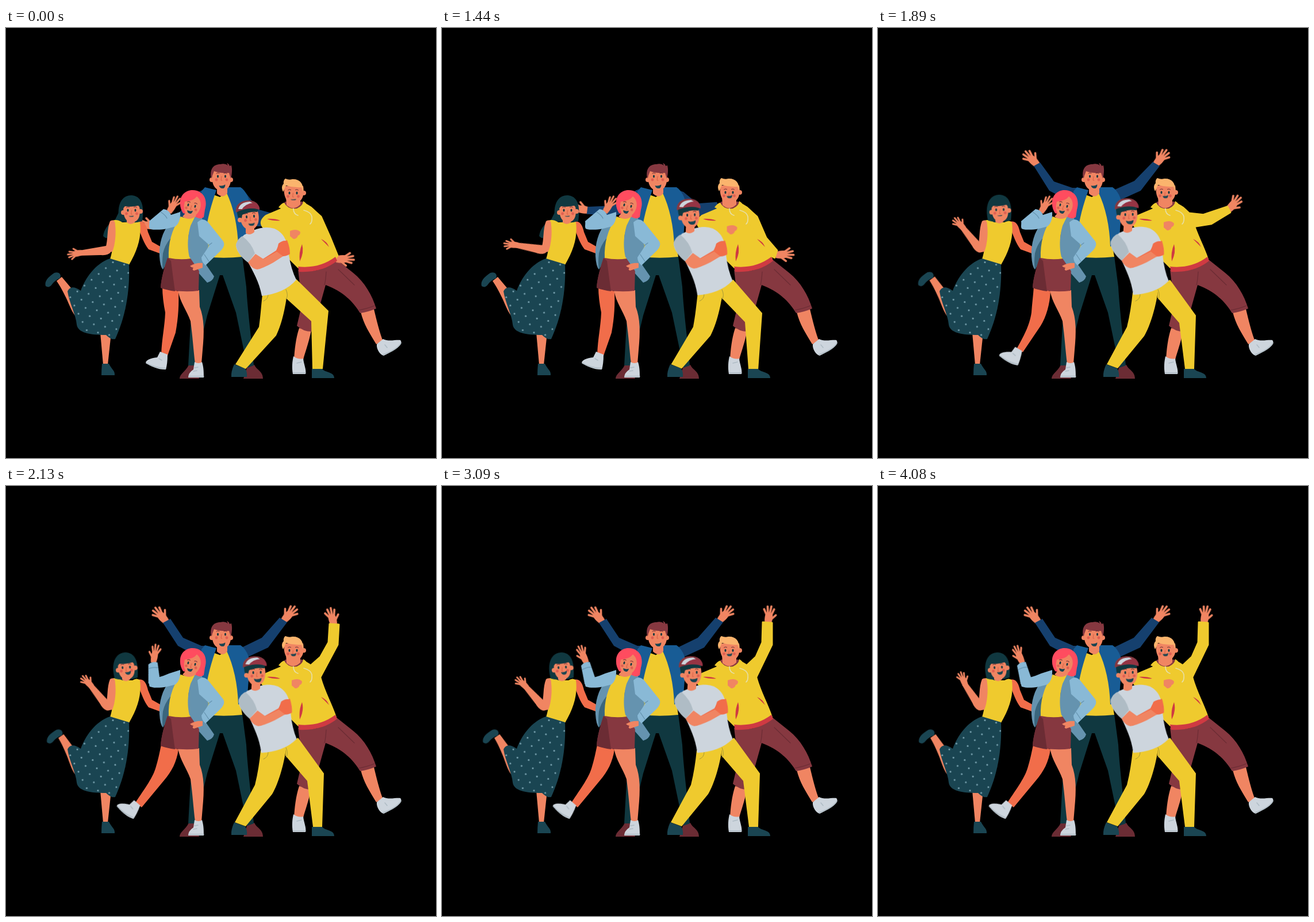
Write an HTML page that moves like this. It is 748 px wide and 748 px high and loops after 4500 ms.

```html
<!DOCTYPE html>
<html lang="en">
<head>
<meta charset="utf-8">
<title>Five friends</title>
<style>
html, body { margin: 0; width: 100%; height: 100%; overflow: hidden; background: #000; }
svg { display: block; width: 100%; height: 100%; }
.peach { fill: #f08562; } .coral { fill: #f16d4a; } .yellow { fill: #efca2e; }
.maroon { fill: #863840; } .wine { fill: #6b2c34; } .red { fill: #cf3a42; }
.teal { fill: #1a4552; } .night { fill: #103840; } .blue { fill: #185c95; } .navy { fill: #15406e; }
.sky { fill: #89b9d6; } .denim { fill: #6593af; } .grey { fill: #cdd5dd; } .shade { fill: #afbcc5; }
.pink { fill: #ff4c5f; } .blond { fill: #fbb46d; }
.line { fill: none; stroke-linecap: round; }
.move { animation: 4.5s linear infinite; }

/* tall man's arms */
@keyframes sleeveL {
  0%, 23.3% { d: path("M350 278L335 285L300 322L255 338L255 350L305 338L345 315Z"); animation-timing-function: ease-in; }
  36% { d: path("M350 278L340 280L297 298L252 288L249 301L300 316L345 310Z"); }
  42% { d: path("M350 278L338 278L306 267L282 234L271 240L298 283L340 305Z"); animation-timing-function: ease-out; }
  47%, 100% { d: path("M350 278L340 278L308 264L286 231L273 238L299 278L340 300Z"); }
}
@keyframes handL {
  0%, 23.3% { transform: translate(257px, 344px) rotate(-85deg); animation-timing-function: ease-in; }
  36% { transform: translate(249px, 294px) rotate(-76deg); }
  42% { transform: translate(275px, 236px) rotate(-45deg); animation-timing-function: ease-out; }
  47%, 100% { transform: translate(277px, 234px) rotate(-42deg); }
}
@keyframes sleeveR {
  0%, 23.3% { d: path("M400 278L418 288L440 316L462 322L460 345L430 345L405 330Z"); animation-timing-function: ease-in; }
  36% { d: path("M400 278L422 283L448 296L492 286L505 298L445 315L415 310Z"); }
  42% { d: path("M400 278L410 282L446 266L478 233L490 240L457 283L415 302Z"); animation-timing-function: ease-out; }
  47%, 100% { d: path("M400 278L410 281L445 264L476 229L489 237L456 281L415 300Z"); }
}
@keyframes handR {
  0%, 23.3% { transform: translate(480px, 345px) rotate(85deg); animation-timing-function: ease-in; }
  36% { transform: translate(505px, 291px) rotate(80deg); }
  42% { transform: translate(485px, 235px) rotate(41deg); animation-timing-function: ease-out; }
  47%, 100% { transform: translate(485px, 232px) rotate(42deg); }
}

/* hoodie */
@keyframes hoodSleeve {
  0%, 23.3% { d: path("M530 312L548 328L564 364L577 396L570 404L550 380L540 350Z"); animation-timing-function: ease-in; }
  36% { d: path("M530 312L548 328L564 366L588 379L586 396L560 394L540 350Z"); }
  42% { d: path("M530 312L541 322L566 325L608 311L613 321L580 341L547 346Z"); }
  47.3% { d: path("M530 312L547 297L561 272L563 240L579 241L577 276L546 334Z"); animation-timing-function: ease-out; }
  58%, 100% { d: path("M530 312L546 297L557 272L558 237L574 238L574 276L546 334Z"); }
}
@keyframes hoodHand {
  0%, 23.3% { transform: translate(577px, 402px) rotate(88deg); animation-timing-function: ease-in; }
  36% { transform: translate(589px, 388px) rotate(84deg); }
  42% { transform: translate(611px, 315px) rotate(42deg); }
  47.3% { transform: translate(570px, 240px) rotate(-15deg); animation-timing-function: ease-in-out; }
  58%, 100% { transform: translate(567px, 237px) rotate(10deg); }
  78% { transform: translate(567px, 237px) rotate(6deg); }
}
@keyframes restHand { 0%, 23.3% { transform: none; animation-timing-function: ease-in-out; } 36% { transform: translate(2px, -10px); } 42%, 100% { transform: translate(3px, -15px); } }
@keyframes grin { 0%, 1% { transform: translate(500px, 297px) scale(.8, .25); } 13.3%, 100% { transform: translate(500px, 292px) scale(.8, .7); } }
@keyframes nod { 0%, .7% { transform: translateY(1px); } 12%, 100% { transform: none; } }

/* cap */
@keyframes lean { 0%, 23.3% { transform: none; animation-timing-function: ease-in-out; } 36% { transform: rotate(2.9deg); } 42%, 100% { transform: rotate(3.5deg); } }
@keyframes capHead { 0%, 23.3% { transform: none; animation-timing-function: ease-in-out; } 36%, 100% { transform: translateX(4px); } }
@keyframes laugh { 0%, .7% { transform: translate(427px, 339px) scale(.9, .7); } 12%, 100% { transform: translate(427px, 338px) scale(1.1, 1); } }
@keyframes tap { 0%, 83.3% { transform: none; } 90.7%, 100% { transform: rotate(5deg); } }
@keyframes kneeL {
  0%, 23.3% { d: path("M446 464L490 450C488 480 480 515 470 535L417 593L399 585L440 520C443 500 444 480 446 464Z"); animation-timing-function: ease-in-out; }
  42%, 100% { d: path("M443 460L488 450C485 480 474 518 463 536L417 592L398 585L433 520C438 500 441 480 443 460Z"); }
}
@keyframes kneeR {
  0%, 23.3% { d: path("M487 450L505 437L561 492L551 593L533 593L531 510L487 470Z"); animation-timing-function: ease-in-out; }
  36% { d: path("M487 450L507 438L556 497L550 593L533 593L526 512L486 469Z"); }
  42%, 100% { d: path("M487 450L508 438L553 500L550 593L534 593L524 513L486 469Z"); }
}

/* girl in the dotted skirt */
@keyframes forearm {
  0%, 23.3% { transform: none; animation-timing-function: ease-in; }
  36% { transform: rotate(29deg); }
  42%, 48% { transform: rotate(57deg); animation-timing-function: ease-in-out; }
  58.7% { transform: rotate(60deg); }
  68.7% { transform: rotate(54deg); animation-timing-function: ease-in-out; }
  82.7%, 100% { transform: rotate(62deg); }
}
@keyframes wrist { 0%, 68.7% { transform: translate(130px, 391px) rotate(-102deg); } 82.7%, 100% { transform: translate(130px, 391px) rotate(-86deg); } }
@keyframes girlHead { 0%, 36% { transform: none; } 42% { transform: translate(-6px, -1px) rotate(-2deg); } 47.5%, 100% { transform: translate(-8.5px, -1.5px) rotate(-4deg); } }
@keyframes tail { 0%, 36% { transform: none; } 42%, 100% { transform: rotate(-42deg); } }
@keyframes smile { 0%, 42% { transform: translate(218px, 327px) scale(.7, .25); } 47.3%, 100% { transform: translate(221px, 325px) scale(.85); } }
@keyframes kick { 0%, 36% { transform: none; } 47.5%, 100% { transform: rotate(3.5deg); } }

/* girl with pink hair */
@keyframes wave {
  0%, 42% { transform: none; animation-timing-function: ease-in-out; }
  47.3% { transform: rotate(-50deg); animation-timing-function: ease-in-out; }
  58.7%, 100% { transform: rotate(-61deg); }
}
@keyframes waveHand {
  0%, 42% { transform: translate(285px, 318px) rotate(32deg); }
  47.3% { transform: translate(285px, 318px) rotate(60deg); animation-timing-function: ease-in-out; }
  58.7%, 100% { transform: translate(285px, 318px) rotate(38deg); }
}
@keyframes stepLeg {
  0%, 36% { d: path("M272 450L300 458C301 480 300 503 295 530L281 570L270 568C271 540 276 520 277 495C274 480 272 465 272 450Z"); }
  42% { d: path("M271 450L300 458C299 480 293 502 283 518L252 564L242 557C257 530 264 515 267 495C268 480 270 465 271 450Z"); animation-timing-function: ease-out; }
  47.3%, 100% { d: path("M270 450L300 458C297 480 288 497 275 512L236 559L225 551C242 525 256 507 261 488C264 478 267 465 270 450Z"); }
}
@keyframes stepShoe {
  0%, 36% { transform: translate(276px, 567px); }
  42% { transform: translate(246px, 560px) rotate(10deg); animation-timing-function: ease-out; }
  47.3%, 100% { transform: translate(229px, 553px) rotate(20deg); }
}
</style>
</head>
<body>
<svg viewBox="0 0 748 748">
<defs>
  <g id="hand" class="peach" transform="scale(1.08)">
    <path d="M-5 3C-7 -4 -7 -11 -5 -15L5 -15C7 -9 6 -3 5 3Z"/>
    <path class="line" stroke="#f08562" stroke-width="3.4" d="M-4 -13L-7 -22M-1 -14L-2 -26M2 -14L4 -25M4 -12L9 -20M-4 -5L-11 -13"/>
  </g>
  <g id="face">
    <circle class="red" cx="-9" cy="6" r="2.4" opacity=".5"/><circle class="red" cx="9" cy="6" r="2.4" opacity=".5"/>
    <ellipse class="night" cx="-6.5" rx="1.5" ry="2.6"/><ellipse class="night" cx="6.5" rx="1.5" ry="2.6"/>
    <path class="line" stroke="#6b2c34" stroke-width="1" d="M-9 -5Q-7 -7 -4 -5.5M4 -5.5Q7 -7 9 -5"/>
    <path class="line" stroke="#d95e45" stroke-width="1" d="M0 0L-1 7L1 7"/>
  </g>
  <path id="mouth" class="teal" d="M-6 0Q0 2 6 -2Q6 6 1 6Q-5 6 -6 0Z"/>
  <path id="gown" d="M181 401L214 411C216 460 207 505 190 541Q183 543 174 534C145 534 125 530 123 516C122 500 110 478 107 458Q113 445 130 457C138 435 155 410 181 401Z"/>
  <pattern id="dots" width="20" height="25" patternUnits="userSpaceOnUse" patternTransform="translate(145 432) rotate(12)">
    <g fill="#7ba5b3"><circle cx="5" cy="5" r="1.5"/><circle cx="15" cy="17.5" r="1.5"/></g>
  </pattern>
</defs>

<g id="tall">
  <g class="move" style="animation-name:handL"><use href="#hand" transform="scale(-1 1)"/></g>
  <g class="move" style="animation-name:handR"><use href="#hand"/></g>
  <path class="move navy" style="animation-name:sleeveL"/>
  <path class="move navy" style="animation-name:sleeveR"/>
  <path class="wine" d="M318 586H330L336 610H302C302 602 312 598 318 586ZM420 588L432 586C436 595 447 597 447 610H413Z"/>
  <path class="night" d="M338 397H411L418 450C420 490 428 550 431 587L420 591L400 495L377 430H372L350 500L329 587H317L323 480Z"/>
  <path class="yellow" d="M358 289L372 294L386 284L400 330L411 398Q375 402 338 397L341 375Z"/>
  <path class="blue" d="M340 284L346 277L366 282C358 305 350 330 346 365L338 378ZM386 277L408 277C417 283 424 296 424 310L419 378L404 380C403 345 396 312 383 285Z"/>
  <path class="peach" d="M367 277H385V287Q378 298 367 288Z"/>
  <g class="peach"><circle cx="358" cy="264" r="4"/><circle cx="391" cy="264" r="4"/><path d="M359 247H391C394 268 389 283 375 283C361 282 356 268 359 247Z"/></g>
  <path class="maroon" d="M357 262C354 246 360 237 373 237Q381 235 386 239L384 235Q388 236 389 240L392 239C394 246 393 255 391 262L388 252Q373 253 362 249Z"/>
  <use href="#face" x="375" y="258"/><use href="#mouth" transform="translate(376 274) scale(.9 .85)"/>
</g>

<g id="hoodie">
  <path class="peach" d="M617 494L640 489C645 510 650 530 656 545L644 550C632 530 622 515 617 494ZM510 522L531 526C526 550 520 565 517 577H501C502 560 504 540 510 522Z"/>
  <path class="grey" d="M645 550L656 541C665 546 678 542 686 543C692 550 680 559 657 570C650 568 644 558 645 550ZM500 571Q508 577 517 575C518 585 523 595 521 602H499C497 590 498 580 500 571Z"/>
  <path class="line" stroke="#afbcc5" stroke-width="1.5" d="M656 568Q680 560 687 548M500 600H521M506 583L514 581M659 551L663 556"/>
  <path class="maroon" d="M508 420C535 428 560 418 574 402L604 426C624 442 637 465 644 488Q630 494 616 496C604 476 586 458 556 447L542 497L534 528Q518 529 506 518L515 480Z"/>
  <path class="line" stroke="#6b2c34" stroke-width="1.2" d="M557 424Q556 440 554 447M578 420L606 447M613 491Q629 488 641 483"/>
  <g class="move" style="animation-name:hoodHand"><use href="#hand" transform="scale(-1 1)"/></g>
  <path class="yellow" d="M478 314L490 303H515C530 307 542 319 548 332C555 358 568 380 575 402Q545 422 508 418L470 380L449 350C439 342 442 332 452 325Z"/>
  <path class="move yellow" style="animation-name:hoodSleeve" stroke="#efca2e" stroke-width="3" stroke-linejoin="round"/>
  <path class="red" d="M508 415Q545 419 573 398L576 405Q550 426 510 424ZM454 332Q467 331 477 335Q464 336 454 332ZM515 376Q519 390 511 406Q509 390 515 376ZM548 367Q558 371 562 381Q555 374 548 367Z"/>
  <path class="maroon" d="M478 309L486 302H516L518 309L499 319Z"/>
  <path class="peach" d="M487 294H512V307Q500 319 488 308Z"/>
  <path class="yellow" d="M474 312Q480 304 484 304Q490 316 506 314Q517 309 517 301Q527 307 525 316Q510 326 496 322Z"/>
  <path class="line" stroke="#e6dfa8" stroke-width="1.6" d="M500 314Q500 324 508 326M518 317Q530 320 532 328Q533 338 529 341"/>
  <path class="move peach" style="animation-name:restHand" d="M494 353Q506 348 512 355Q512 360 508 361Q506 367 500 367L494 362Z"/>
  <g class="move" style="animation-name:nod">
    <g class="peach"><circle cx="518" cy="286" r="4"/><path d="M484 274H517C520 292 514 304 500 304C487 304 482 290 484 274Z"/></g>
    <path class="blond" d="M482 284C478 276 481 272 483 270Q482 264 486 261Q492 264 498 262C511 261 518 270 517 284L514 276Q500 277 487 273Z"/>
    <use href="#face" x="499.5" y="286"/>
    <use href="#mouth" class="move" style="animation-name:grin"/>
  </g>
</g>

<g id="cap">
  <path class="teal" d="M397 585L416 592Q420 599 419 607H392Q391 598 397 585ZM532 593H550C556 600 571 598 571 609H532Z"/>
  <path class="move yellow" style="animation-name:kneeR"/>
  <path class="move yellow" style="animation-name:kneeL"/>
  <path class="line" stroke="#a79a35" d="M487 455Q492 466 487 472M456 463Q456 472 448 475"/>
  <g class="move" style="animation-name:lean;transform-origin:475px 450px">
    <path class="grey" d="M414 360L430 352Q450 344 467 349C483 356 490 370 492 395Q496 420 505 438C490 455 470 463 445 466C440 440 430 425 420 405C404 395 398 382 401 374Z"/>
    <path class="shade" d="M400 377Q403 366 411 362Q427 374 433 392L421 408Q402 394 400 377Z"/>
    <path class="coral" d="M475 376L489 369Q494 382 494 393Q486 399 466 397L445 403L470 387Z"/>
    <path class="peach" d="M421 408L434 393L448 402L471 389L482 397L465 408Q445 419 437 420Q428 419 421 408Z"/>
    <path class="move coral" style="animation-name:tap;transform-origin:474px 386px" d="M471 388L474 375Q483 368 489 371L486 379L491 381L481 388Z"/>
    <g class="move" style="animation-name:capHead">
      <path class="peach" d="M417 343H432V355Q424 362 417 357Z"/>
      <g class="move" style="animation-name:nod">
        <path class="peach" d="M407 318H438C443 334 437 350 424 350C413 349 406 338 407 318Z"/>
        <path class="night" d="M402 314L438 308Q440 314 437 319Q424 318 411 324L409 335Q401 330 402 314Z"/>
        <circle class="peach" cx="407" cy="333" r="4"/>
        <path class="maroon" d="M400 320C398 305 410 298 424 299C436 300 441 307 440 314Q420 310 400 320Z"/>
        <path class="grey" d="M404 314Q407 302 424 301L430 304Q416 305 411 314Z"/>
        <path fill="#963444" d="M410 315Q416 305 430 303Q442 305 441 315Q426 310 410 315Z"/>
        <use href="#face" transform="translate(425 327) rotate(-5)"/>
        <use href="#mouth" class="move" style="animation-name:laugh"/>
      </g>
    </g>
  </g>
</g>

<g id="skirt">
  <g class="move" style="animation-name:kick;transform-origin:118px 488px">
    <path class="peach" d="M88 440L97 433L118 458L121 501C112 492 108 470 88 440Z"/>
    <path class="teal" d="M69 449C66 440 75 432 84 426C92 423 97 429 94 435Q85 439 80 446Q75 453 69 449Z"/>
  </g>
  <path class="peach" d="M164 530H183L177 586H169Z"/>
  <path class="teal" d="M167 584H179C183 593 190 596 189 604H166Q166 594 167 584Z"/>
  <path class="move night" style="animation-name:tail;transform-origin:203px 322px" d="M199 315L210 330Q194 345 180 364Q175 368 169 362Q171 345 190 333Z"/>
  <path class="coral" d="M230 337C241 334 245 346 247 355L254 372L270 381V393L248 385C240 375 235 360 231 350Z"/>
  <path class="yellow" d="M185 335Q194 332 202 338H220Q228 333 233 338C236 362 230 385 214 412L181 402C188 380 187 360 185 335Z"/>
  <use href="#gown" class="teal"/>
  <use href="#gown" fill="url(#dots)"/>
  <g class="move" style="animation-name:forearm;transform-origin:179px 386px">
    <path class="peach" d="M128 387L174 379Q186 382 182 390Q178 396 165 395L128 396Z"/>
    <g class="move" style="animation-name:wrist"><use href="#hand" transform="scale(-.8 .8)"/></g>
  </g>
  <path class="peach" d="M181 336Q190 331 190 343C192 360 189 380 185 389Q176 392 173 383C178 368 175 350 181 336Z"/>
  <g class="move" style="animation-name:girlHead;transform-origin:217px 330px">
    <path class="night" d="M197 335C192 308 201 291 218 291C236 292 241 309 237 336Q218 342 197 335Z"/>
    <path class="peach" d="M210 330H224V338Q217 344 210 338Z"/>
    <g class="peach"><circle cx="204" cy="321" r="4"/><circle cx="234" cy="319" r="4"/><path d="M205 307H231C236 324 231 338 219 338C207 338 202 324 205 307Z"/></g>
    <path class="night" d="M201 317C200 302 210 296 220 297C230 297 236 306 235 314L230 309Q218 312 207 310Z"/>
    <use href="#face" x="218.5" y="317"/>
    <use href="#mouth" class="move" style="animation-name:smile"/>
  </g>
</g>

<g id="pinkhair">
  <path class="move coral" style="animation-name:stepLeg"/>
  <g class="move" style="animation-name:stepShoe">
    <path class="grey" d="M-8 -4L5 1Q5 17 2 27C-8 28 -25 22 -33 15Q-31 8 -13 6Z"/>
    <path class="line" stroke="#afbcc5" stroke-width="1.5" d="M-32 16Q-15 25 2 25M-10 8L-5 11"/>
  </g>
  <path class="peach" d="M299 456L336 456L337 485C345 505 345 530 342 560L340 584H329C326 560 325 540 321 510C314 490 303 478 299 456Z"/>
  <path class="grey" d="M328 581Q335 585 341 581C344 590 344 600 344 608H317Q317 600 326 594Z"/>
  <path class="line" stroke="#afbcc5" stroke-width="1.5" d="M318 606H344M326 597L332 596M328 591L334 590"/>
  <path class="denim" d="M304 327L284 340C272 355 266 375 267 397Q268 415 273 420L284 402L300 345ZM330 326L345 335L352 380L342 403L362 432Q360 440 350 443L334 425L316 400L318 345Z"/>
  <path fill="#3a667d" d="M286 366Q276 378 273 392Q271 408 273 420L284 402Z"/>
  <path class="maroon" d="M281 400L325 401Q336 402 336 418L335 457C310 460 285 457 269 452C270 435 276 415 281 400Z"/>
  <path class="wine" d="M281 400L287 405Q290 430 294 458Q280 456 269 452C270 435 276 415 281 400Z"/>
  <path class="yellow" d="M304 328Q316 333 329 328L321 344C315 365 316 385 322 401Q303 404 283 400C282 375 288 350 304 328Z"/>
  <path class="denim" d="M330 327L341 330L347 380L341 404L353 426L343 433L319 398C314 375 316 350 330 327Z"/>
  <path class="peach" d="M342 409Q330 408 320 414Q323 417 326 417Q323 421 327 422L342 417Z"/>
  <path class="sky" d="M333 338Q344 327 354 341L378 371Q382 378 374 387L347 413Q340 407 340 399L354 378L336 362Z"/>
  <path class="line" stroke="#6593af" stroke-width="1.3" d="M345 394L353 406M350 380L358 374"/>
  <path class="sky" d="M303 320Q304 338 295 345C280 350 262 353 250 349Q247 343 252 335Q266 334 284 326Z"/>
  <g class="move" style="animation-name:wave;transform-origin:256px 341px">
    <g class="move" style="animation-name:waveHand"><use href="#hand" transform="scale(.85 1)"/></g>
    <path class="sky" d="M249 336L274 315Q283 316 287 325L267 347Q258 353 250 349Z"/>
    <path class="line" stroke="#6593af" stroke-width="1.3" d="M269 320Q277 325 280 331"/>
  </g>
  <path class="pink" d="M303 302C304 286 319 279 332 283C347 288 350 302 346 316L344 329Q338 333 333 330L308 322Q302 313 303 302Z"/>
  <path class="peach" d="M314 320L331 322L330 328Q318 336 307 328Z"/>
  <path class="peach" d="M311 302Q326 301 332 293C339 298 341 309 336 318C331 328 322 330 315 325Q307 317 311 302Z"/>
  <use href="#face" transform="translate(323 309) rotate(12) scale(.95)"/>
  <use href="#mouth" transform="translate(320 318) rotate(16) scale(.8)"/>
</g>
</svg>
</body>
</html>
```
